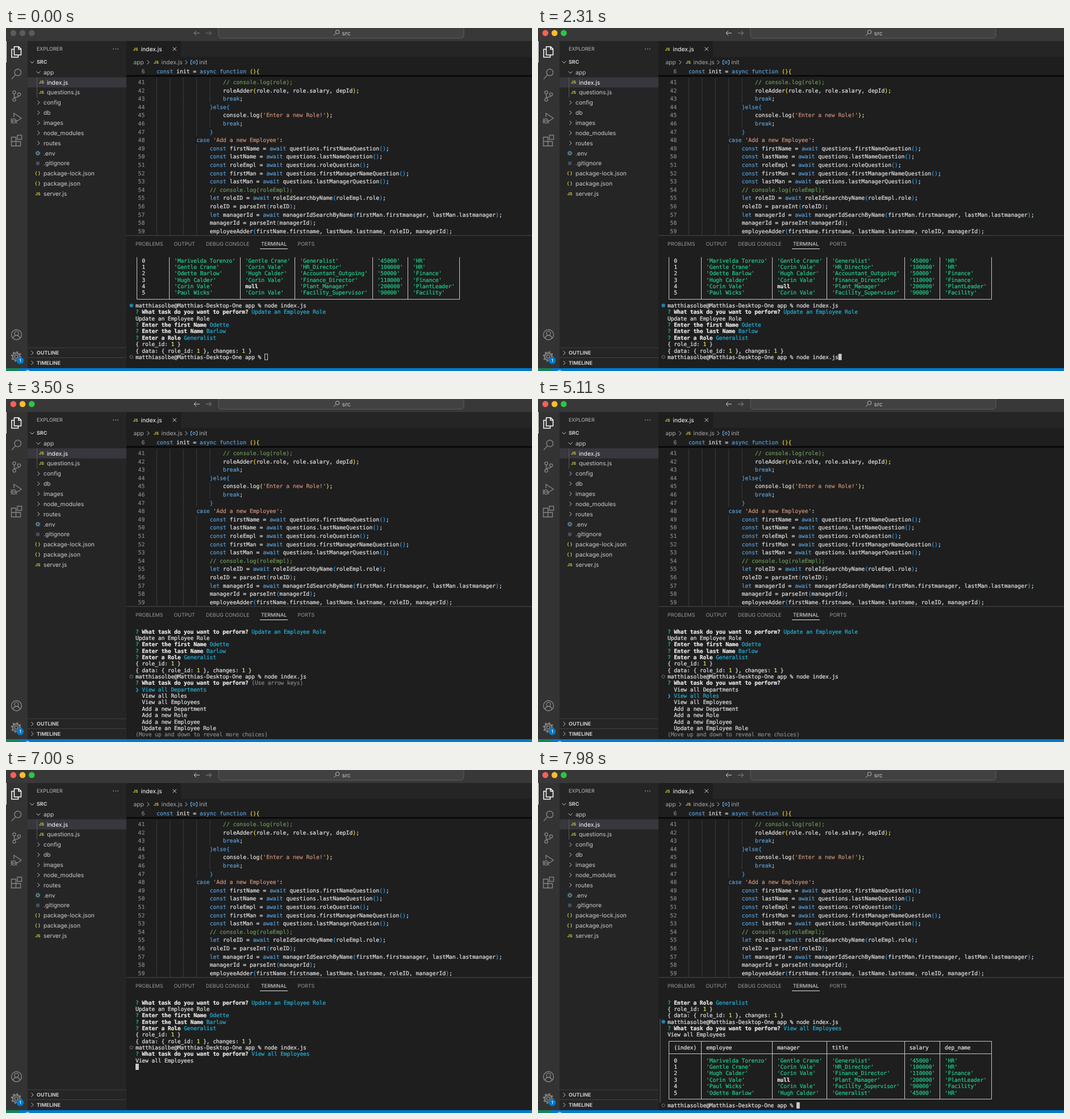
An HTML page for the animation above (8 s loop, 926 by 605 pixels).

```html
<!DOCTYPE html>
<html lang="en">
<head>
<meta charset="utf-8">
<title>Editor with terminal</title>
<style>
html, body { margin: 0; width: 100%; height: 100%; overflow: hidden; background: #1e1e1e; }
svg { display: block; }
text { white-space: pre; text-rendering: geometricPrecision; }
.ui { font-family: Inter, "Open Sans", sans-serif; }
.mono { font: 9.72px "DejaVu Sans Mono", monospace; }
.mono text, .mono tspan { fill: currentColor; stroke: currentColor; stroke-width: .22; }
.term { letter-spacing: -.177px; }
.w { color: #e2e2e2; }
.b { color: #ececec; font-weight: bold; }
.k { color: #569cd6; }
.s { color: #ce9178; }
.m { color: #6a9955; }
.y { color: #f7dc3a; }
.p { color: #2f9ff0; }
.g { color: #22cc8a; }
.c { color: #22b0d8; }
.n { color: #e8e85a; }
.d { color: #858585; }
.icon { fill: none; stroke: #858585; stroke-width: 1.4; }
</style>
</head>
<body>
<svg width="926" height="605" viewBox="0 0 926 605">
  <g id="frame"></g>
  <g id="lights"></g>
  <g id="code" class="mono"></g>
  <g id="terminal" class="mono term"></g>
</svg>
<script>
const $ = id => document.getElementById(id);
const rect = (x, y, w, h, fill, extra = '') =>
  `<rect x="${x}" y="${y}" width="${w}" height="${h}" fill="${fill}" ${extra}/>`;
const circle = (x, y, r, fill, extra = '') =>
  `<circle cx="${x}" cy="${y}" r="${r}" fill="${fill}" ${extra}/>`;
const path = (d, stroke, width = 1) =>
  `<path d="${d}" fill="none" stroke="${stroke}" stroke-width="${width}"/>`;
// y is the middle of the capitals
const label = (x, y, str, size = 10.3, fill = '#ccc', extra = '') =>
  `<text class="ui" x="${x}" y="${y + size * .36}" font-size="${size}" fill="${fill}" ${extra}>${str}</text>`;
// "~x" switches the following characters to class x
const rich = (x, y, str) => {
  const parts = ('~w' + str).split(/~(\w)/);
  let spans = '';
  for (let i = 1; i < parts.length; i += 2)
    if (parts[i + 1]) spans += `<tspan class="${parts[i]}">${parts[i + 1]}</tspan>`;
  return `<text x="${x}" y="${y}">${spans}</text>`;
};
const chevron = (x, y, open) =>
  path(open ? `M${x - 3.5} ${y - 1.5}l3.5 3.5l3.5 -3.5` : `M${x - 1.5} ${y - 3.5}l3.5 3.5l-3.5 3.5`, '#c5c5c5');
const js = (x, y) => label(x, y, 'JS', 7.2, '#d2cb45', 'font-weight="700"');
const gear = (x, y, r, color, width) =>
  circle(x, y, r, 'none', `stroke="${color}" stroke-width="${width}"`) +
  circle(x, y, r + width, 'none', `stroke="${color}" stroke-width="${width}" stroke-dasharray="${(r + width) * Math.PI / 8}"`);

function titleBar() {
  return rect(0, 0, 926, 23, '#383838') +
    rect(374, -6, 432, 24, '#414141', 'rx="5" stroke="#5c5c5c"') +
    circle(583.5, 7, 3.3, 'none', 'stroke="#bbb"') + path('M581 9.5l-4 4', '#bbb') +
    label(591.5, 9, 'src');
}

function activityBar() {
  return rect(0, 23, 38, 577, '#333') + rect(0, 23, 1, 38, '#fff') +
    path('M14.5 33h8l4 4v10.5h-12zM22 33v4.5h4.5M14.5 37.5h-4.5v14h11.5v-4', '#fff', 1.5) +
    '<g class="icon">' +
    '<circle cx="20.8" cy="78.3" r="5.8"/><path d="M16.7 82.6L10 90"/>' +
    '<circle cx="14.5" cy="113.5" r="2.6"/><circle cx="23" cy="117" r="2.6"/><circle cx="14.5" cy="126.5" r="2.6"/>' +
    '<path d="M14.5 116v8M23 119.6c0 4 -8.5 1 -8.5 4.5"/>' +
    '<path d="M14 157v-6.5l13 8.5l-8 5.5"/><circle cx="14" cy="164" r="3.8"/><path d="M8.5 160l2.5 2M8.5 168l2.5 -2M8 164h12M19.5 168l-2.5 -2"/>' +
    '<path d="M9.5 192.5h8v15.5h-8zM9.5 200.3h16v7.7h-8"/><rect x="20" y="189" width="7.5" height="7.5"/>' +
    '<circle cx="18.5" cy="541" r="9"/><circle cx="18.5" cy="538.5" r="3.6"/><path d="M12.5 547.5c1 -7 11 -7 12 0"/></g>' +
    gear(18, 579.5, 2.6, '#858585', 1.2) + gear(18, 579.5, 6.3, '#858585', 2) +
    circle(25, 586.5, 6.3, '#007acc') + label(25, 586.5, '1', 7.5, '#fff', 'text-anchor="middle" font-weight="600"');
}

function sideBar() {
  const pitch = 17.85, rowY = i => 78 + pitch * i;
  let out = rect(38, 23, 174, 577, '#252526') + rect(38, 87, 174, 17.8, '#37373d') +
    rect(54, 87, 1, 35.5, '#585858') +
    label(54, 37, 'EXPLORER', 8.95, '#bbb') +
    [189, 193, 197].map(x => circle(x, 37, .8, '#c5c5c5')).join('') +
    chevron(46, 60, true) + label(54, 60, 'SRC', 8.95, '#ccc', 'font-weight="700"') +
    chevron(57, rowY(0), true) + label(66, rowY(0), 'app');
  ['index.js', 'questions.js'].forEach((name, i) =>
    out += js(58, rowY(i + 1)) + label(72, rowY(i + 1), name, 10.3, i ? '#ccc' : '#fff'));
  ['config', 'db', 'images', 'node_modules', 'routes'].forEach((name, i) =>
    out += chevron(57, rowY(i + 3)) + label(66, rowY(i + 3), name));
  ['.env', '.gitignore', 'package-lock.json', 'package.json', 'server.js'].forEach((name, i) =>
    out += label(66, rowY(i + 8), name));
  out += gear(56, rowY(8), 2.2, '#5f93a8', 1.4) +
    rect(53, rowY(9) - 3, 6, 6, '#41535b') +
    [10, 11].map(i => label(51, rowY(i), '{ }', 8.2, '#cbcb41', 'font-weight="600"')).join('') +
    js(51.5, rowY(12));
  [['OUTLINE', 573], ['TIMELINE', 590.5]].forEach(([name, y]) =>
    out += rect(38, y - 9.5, 174, 1, '#414142') + chevron(46, y) +
      label(54, y, name, 8.95, '#ccc', 'font-weight="700"'));
  return out;
}

function editorChrome() {
  let out = rect(212, 23, 714, 28, '#252526') + rect(212, 23, 96, 28, '#1e1e1e') +
    js(223.5, 37) + label(237.5, 37, 'index.js', 10.3, '#fff') +
    path('M293.5 33.8l6.4 6.4M299.9 33.8l-6.4 6.4', '#ddd') +
    label(224.5, 60.5, 'app', 10.3, '#a9a9a9') + chevron(250, 60.5) + js(260, 60.5) +
    label(273.5, 60.5, 'index.js', 10.3, '#a9a9a9') + chevron(317, 60.5) +
    path('M328 57h-2.5v7h2.5M334 57h2.5v7h-2.5', '#75beff') + circle(331, 60.5, 2, 'none', 'stroke="#75beff"') +
    label(340, 60.5, 'init', 10.3, '#a9a9a9') +
    rect(212, 83.3, 714, 2.4, '#050505') + rect(212, 365.5, 714, 1, '#4a4a4a');
  [['PROBLEMS', 228], ['OUTPUT', 295.5], ['DEBUG CONSOLE', 352], ['TERMINAL', 449], ['PORTS', 513.5]].forEach(([name, x]) =>
    out += label(x, 381, name, 8.95, name === 'TERMINAL' ? '#e7e7e7' : '#9a9a9a'));
  return out + rect(447, 389, 49, 1, '#e7e7e7');
}

function statusBar() {
  return rect(0, 600, 926, 5, '#007acc') + rect(0, 600, 24, 5, '#16825d') +
    circle(38, 608, 4.2, 'none', 'stroke="#fff"') +
    label(45, 608.5, '0', 9.5, '#fff') + label(67, 608.5, '0', 9.5, '#fff') +
    label(690, 608.5, 'Ln 6, Col 7    Spaces: 4    UTF-8    LF    JavaScript', 9.5, '#fff');
}

function codeArea() {
  const indent = 23.42, left = 265, pitch = 14.6;
  const lines = [
    [5, '// console.log(role);'],
    [5, 'roleAdder(role.role, role.salary, depId);'],
    [5, 'break;'],
    [4, '}else{'],
    [5, "console.log('Enter a new Role!');"],
    [5, 'break;'],
    [4, '}'],
    [3, "case 'Add a new Employee':"],
    [4, 'const firstName = await questions.firstNameQuestion();'],
    [4, 'const lastName = await questions.lastNameQuestion();'],
    [4, 'const roleEmpl = await questions.roleQuestion();'],
    [4, 'const firstMan = await questions.firstManagerNameQuestion();'],
    [4, 'const lastMan = await questions.lastManagerQuestion();'],
    [4, '// console.log(roleEmpl);'],
    [4, 'let roleID = await roleIdSearchbyName(roleEmpl.role);'],
    [4, 'roleID = parseInt(roleID);'],
    [4, 'let managerId = await managerIdSearchByName(firstMan.firstmanager, lastMan.lastmanager);'],
    [4, 'managerId = parseInt(managerId);'],
    [4, 'employeeAdder(firstName.firstname, lastName.lastname, roleID, managerId);']
  ];
  const tokens = /(\/\/.*)|('[^']*')|\b(const|let|await|async|function|case|break|else)\b|[(){}]/g;
  const paint = (str, bracket) => str.replace(tokens, (m, comment, quote, word) =>
    `~${comment ? 'm' : quote ? 's' : word ? 'k' : bracket}${m}~w`);
  const number = (n, y) => `<text class="d" x="244.3" y="${y}" text-anchor="end">${n}</text>`;
  let out = number(6, 79.6) + rich(left, 79.6, paint('const init = async function (){', 'y'));
  lines.forEach(([level, str], i) => {
    const y = 99 + pitch * i;
    for (let j = 0; j < level; j++) {
      const top = Math.max(y - 10.8, 86);
      out += rect(left + indent * j, top, .9, Math.min(y - 10.8 + pitch, 365.5) - top, '#404040');
    }
    out += number(41 + i, y) + rich(left + indent * level, y, paint(str, level === 5 ? 'y' : 'p'));
  });
  return out;
}

function windowControls(active) {
  const colors = active ? ['#ff5f57', '#febc2e', '#28c840'] : Array(3).fill('#5b5b5b');
  return colors.map((fill, i) => circle(12.9 + 16.2 * i, 8.9, 5.3, fill)).join('') +
    path('M341 9h-10M335 5l-4 4l4 4', active ? '#d0d0d0' : '#8f8f8f') +
    path('M351.5 9h10M357.5 5l4 4l-4 4', active ? '#8a8a8a' : '#757575');
}

// Terminal grid
const cellW = 5.675, cellH = 11.35;
const colX = c => 228 + cellW * c;
const rowTop = r => 404.3 + cellH * r;
const mid = r => rowTop(r) + cellH / 2;
const write = (row, str, col = 0) => rich(colX(col), rowTop(row) + 9.3, str);
const rows = (first, list) => list.map((str, i) => write(first + i, str)).join('');
const cursor = (row, col, hollow) => hollow
  ? rect(colX(col) + .5, rowTop(row) + .5, 5, 10.2, 'none', 'stroke="#ccc"')
  : rect(colX(col), rowTop(row) + .2, 5.8, 11, '#ccc');
const done = row => circle(220.7, mid(row), 3.2, '#2580ad');
const pending = row => circle(220.7, mid(row), 2.6, 'none', 'stroke="#808080" stroke-width=".9"');
const guide = (top, bottom) => rect(214, top, 2, bottom - top, '#414145');

const staff = {
  marivelda: ['Marivelda Torenzo', 'Gentle Crane', 'Generalist', 45000, 'HR'],
  gentle: ['Gentle Crane', 'Corin Vale', 'HR_Director', 100000, 'HR'],
  odette: ['Odette Barlow', 'Hugh Calder', 'Accountant_Outgoing', 50000, 'Finance'],
  hugh: ['Hugh Calder', 'Corin Vale', 'Finance_Director', 110000, 'Finance'],
  corin: ['Corin Vale', null, 'Plant_Manager', 200000, 'PlantLeader'],
  paul: ['Paul Wicks', 'Corin Vale', 'Facility_Supervisor', 90000, 'Facility']
};
const { marivelda, gentle, odette, hugh, corin, paul } = staff;
const before = [marivelda, gentle, odette, hugh, corin, paul];
const after = [marivelda, gentle, hugh, corin, paul, ['Odette Barlow', 'Hugh Calder', 'Generalist', 45000, 'HR']];

function table(firstRow, people, headed) {
  const crisp = v => Math.floor(v) + .5;
  const edges = [0, 10, 32, 49, 73, 84, 100].map(c => crisp(colX(c + .5)));
  const top = headed ? crisp(mid(firstRow - 3)) : rowTop(firstRow);
  const bottom = crisp(mid(firstRow + people.length));
  const rule = y => `M${edges[0]} ${y}H${edges[6]}`;
  let d = edges.map(x => `M${x} ${top}V${bottom}`).join('') + rule(bottom);
  let out = '';
  const put = (row, cells) => cells.forEach((str, i) => out += write(row, str, [2, 12, 34, 51, 75, 86][i]));
  if (headed) {
    d += rule(top) + rule(crisp(mid(firstRow - 1)));
    put(firstRow - 2, ['(index)', 'employee', 'manager', 'title', 'salary', 'dep_name']);
  }
  people.forEach((person, i) =>
    put(firstRow + i, ['' + i, ...person.map(v => v === null ? '~bnull' : `~g'${v}'`)]));
  return out + path(d, '#c8c8c8');
}

const prompt = 'matthiasolbe@Matthias-Desktop-One app % ';
const run = prompt + 'node index.js';
const ask = '~g? ~bWhat task do you want to perform? ';
const update = [
  ask + '~cUpdate an Employee Role', 'Update an Employee Role',
  '~g? ~bEnter the first Name ~cOdette', '~g? ~bEnter the last Name ~cBarlow',
  '~g? ~bEnter a Role ~cGeneralist',
  '{ role_id: ~n1~w }', '{ data: { role_id: ~n1~w }, changes: ~n1~w }'
];
const choices = ['View all Departments', 'View all Roles', 'View all Employees', 'Add a new Department',
  'Add a new Role', 'Add a new Employee', 'Update an Employee Role'];
const answer = [ask + '~cView all Employees', 'View all Employees'];

const idle = last => table(0, before) + rows(7, [run, ...update, last]) + done(7) + pending(15);
const menu = (picked, hint = '') => rows(0, [...update, run, ask + hint,
  ...choices.map((name, i) => i === picked ? '~c❯ ' + name : '  ' + name),
  '~d(Move up and down to reveal more choices)']) + pending(7);
const result = () => rows(0, [...update.slice(4), run, ...answer]) + done(3) +
  table(9, after, true) + write(16, prompt) + pending(16) + cursor(16, 40);

const scenes = [
  [0, () => idle(prompt) + cursor(15, 40, true)],
  [980, () => idle(prompt) + cursor(15, 40) + guide(404, 484)],
  [2310, () => idle(run) + cursor(15, 53)],
  [3290, () => idle(run) + cursor(16, 0)],
  [3500, () => menu(0, '~d(Use arrow keys)')],
  [5110, () => menu(1)],
  [5880, () => menu(2)],
  [7000, () => rows(0, [...update, run, ...answer]) + pending(7) + cursor(10, 0)],
  [7070, result],
  [7910, () => guide(439, 587) + result()]
];

$('frame').innerHTML = titleBar() + activityBar() + sideBar() + editorChrome() + statusBar();
$('code').innerHTML = codeArea();

let shown = -1;
function draw() {
  const t = performance.now() % 8000;
  const now = scenes.findLastIndex(([start]) => t >= start);
  if (now !== shown) {
    shown = now;
    $('lights').innerHTML = windowControls(now > 0);
    $('terminal').innerHTML = scenes[now][1]();
  }
  requestAnimationFrame(draw);
}
draw();
</script>
</body>
</html>
```
